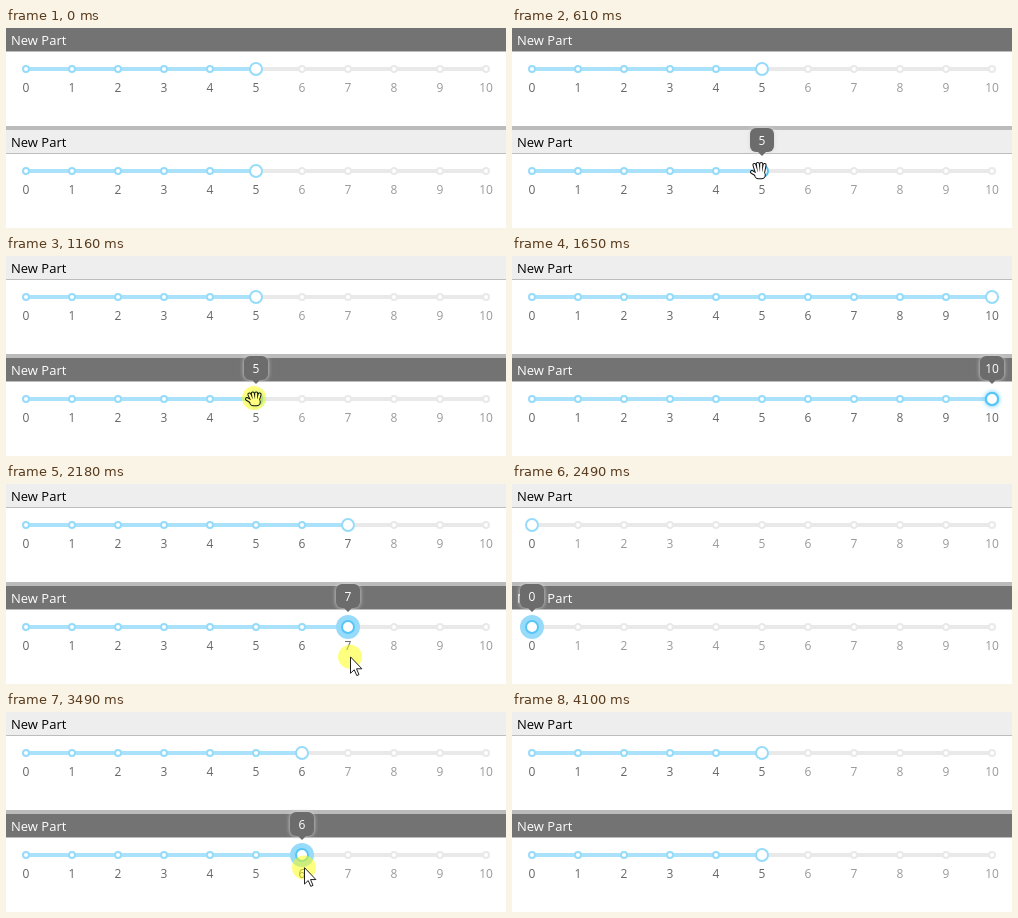
These frames come from a looping animation (500 px wide and 200 px high, 4.73 s). An HTML page with a canvas:

```html
<!DOCTYPE html>
<html lang="en">
<head>
<meta charset="utf-8">
<title>Linked sliders</title>
<style>
html, body { margin: 0; width: 100%; height: 100%; overflow: hidden; background: #fff; }
canvas { display: block; width: 500px; height: 200px; }
</style>
</head>
<body>
<canvas id="stage" width="500" height="200"></canvas>
<script>
const ctx = document.getElementById('stage').getContext('2d');
const LOOP = 4730, ENTER = 70, PRESS = 1160, FOCUS = 2100, RELEASE = 3950, LEAVE = 4025;
const FONT = '"Open Sans", "Noto Sans", sans-serif';
const BLUE = '#96dbfa', STRONG = '#57c5f7', YELLOW = '#ffff80';

// Pointer moves along quadratic curves, in a few hard steps each
const MOVES = [
  { from: ENTER, to: 530, steps: 7, x: [394, 165, 247], y: [180, 143, 143] },
  { from: 760, to: 990, steps: 4, x: [247, 252, 248], y: [143, 158, 142] },
  { from: 1310, to: 1650, steps: 5, x: [291, 410, 530], y: [142, 142, 142] },
  { from: FOCUS, to: 2490, steps: 6, x: [440, 200, -40], y: [171, 176, 176] },
  { from: 3100, to: 3590, steps: 7, x: [-70, 434, 254], y: [160, 149, 161] }
];
const ARROW = new Path2D('M.5 .5V16.5L4.2 13L6.8 18.8L9 17.8L6.5 12H11.5Z');

const clamp = v => Math.max(0, Math.min(1, v));
const tickX = i => 20 + 46 * i;
const bezier = ([a, b, c], f) => a * (1 - f) ** 2 + 2 * b * f * (1 - f) + c * f * f;

function pointer(t) {
  const m = MOVES.filter(move => move.from <= t).pop() || MOVES[0];
  const last = m.steps - 1;
  const f = Math.floor(clamp((t - m.from) / (m.to - m.from)) * last + 0.01) / last;
  return { x: bezier(m.x, f), y: bezier(m.y, f) };
}

// Opens on hover, dips while the pointer slips off, closes at the end
function tipScale(t) {
  if (t < 760) return clamp((t - 300) / 200);
  if (t < 990) return clamp(Math.abs(t - 860) / 100);
  return clamp((4090 - t) / 140);
}

function circle(x, y, r, fill, stroke) {
  ctx.beginPath();
  ctx.arc(x, y, r, 0, 7);
  ctx.fillStyle = fill;
  ctx.fill();
  if (stroke) {
    ctx.strokeStyle = stroke;
    ctx.lineWidth = 2;
    ctx.stroke();
  }
}

function line(x1, y1, x2, y2, width, color) {
  ctx.beginPath();
  ctx.moveTo(x1, y1);
  ctx.lineTo(x2, y2);
  ctx.lineCap = 'round';
  ctx.lineWidth = width;
  ctx.strokeStyle = color;
  ctx.stroke();
}

function box(x, y, w, h, color) {
  ctx.fillStyle = color;
  ctx.fillRect(x, y, w, h);
}

function text(str, x, y, font, color, align) {
  ctx.font = font + ' ' + FONT;
  ctx.textAlign = align;
  ctx.fillStyle = color;
  ctx.fillText(str, x, y);
}

function header(y, active) {
  box(0, y, 500, 23, active ? '#737373' : '#eeeeee');
  box(0, y + 23, 500, 1, '#bdbdbd');
  text('New Part', 5, y + 17, '500 13px', active ? '#fff' : '#000', 'left');
}

function slider(y, value, look) {
  const hx = tickX(value);
  line(20, y, 480, y, 4, '#e9e9e9');
  line(20, y, hx, y, 4, '#abe2fb');
  for (let i = 0; i <= 10; i++) {
    const on = i <= value;
    circle(tickX(i), y, 3, '#fff', on ? BLUE : '#e9e9e9');
    text(i, tickX(i), y + 23, '12px', on ? '#666' : '#999', 'center');
  }
  if (look.ring) circle(hx, y, 12, BLUE);
  if (look.glow) {
    ctx.shadowColor = STRONG;
    ctx.shadowBlur = 5;
    circle(hx, y, 7, STRONG);
    ctx.shadowBlur = 0;
  }
  circle(hx, y, 6, '#fff', look.strong ? STRONG : BLUE);
}

function tooltip(value, scale) {
  if (scale <= 0) return;
  ctx.save();
  ctx.translate(tickX(value), 128);
  ctx.scale(scale, scale);
  ctx.shadowColor = '#d9d9d9';
  ctx.shadowBlur = 4;
  ctx.fillStyle = '#6c6c6c';
  ctx.beginPath();
  ctx.roundRect(-12, -28, 24, 24, 6);
  ctx.fill();
  ctx.shadowBlur = 0;
  ctx.beginPath();
  ctx.moveTo(-4, -4);
  ctx.lineTo(4, -4);
  ctx.lineTo(0, 0);
  ctx.fill();
  text(value, 0, -11, '500 12px', '#fff', 'center');
  ctx.restore();
}

// Fingers fan out from the palm; the dark pass leaves an outline
function hand(reach, fill) {
  for (const [edge, color] of [[2, '#111'], [0, fill]]) {
    for (let i = 0; i < 4; i++) {
      const side = i - 1.5;
      line(side * 2 + 1, 2, side * 3.4 + 0.5, Math.abs(side) - reach, 2 + edge, color);
    }
    line(-2, 4, -7, 1, 2 + edge, color);
    line(-0.5, 4, 2.5, 4, 6.5 + edge, color);
  }
}

function arrow() {
  ctx.fillStyle = '#fff';
  ctx.fill(ARROW);
  ctx.strokeStyle = '#222';
  ctx.lineWidth = 1;
  ctx.stroke(ARROW);
}

function drawPointer(p, near, pressed) {
  if (pressed) circle(p.x, p.y, 12, 'rgba(255,255,0,.5)');
  ctx.save();
  ctx.translate(p.x, p.y);
  if (!near) arrow();
  else if (pressed) hand(5, YELLOW);
  else hand(7.5, '#fff');
  ctx.restore();
}

function draw(t) {
  const p = pointer(t);
  const dragging = t >= PRESS && t < RELEASE;
  const value = t < PRESS ? 5 : Math.round(clamp((p.x - 20) / 460) * 10);
  const near = Math.abs(p.x - tickX(value)) < 21 && Math.abs(p.y - 143) < 8;

  box(0, 0, 500, 200, '#fff');
  box(0, 98, 500, 4, '#bbbbbb');
  header(0, t < PRESS);
  header(102, t >= PRESS);
  slider(41, value, {});
  slider(143, value, {
    ring: t >= FOCUS && t < LEAVE,
    glow: dragging && t < FOCUS,
    strong: dragging || (near && t >= 300 && t < PRESS)
  });
  tooltip(value, tipScale(t));
  if (t >= ENTER && t < LEAVE) drawPointer(p, near, dragging);
}

const start = performance.now();
function frame() {
  draw((performance.now() - start) % LOOP);
  requestAnimationFrame(frame);
}
frame();
</script>
</body>
</html>
```
